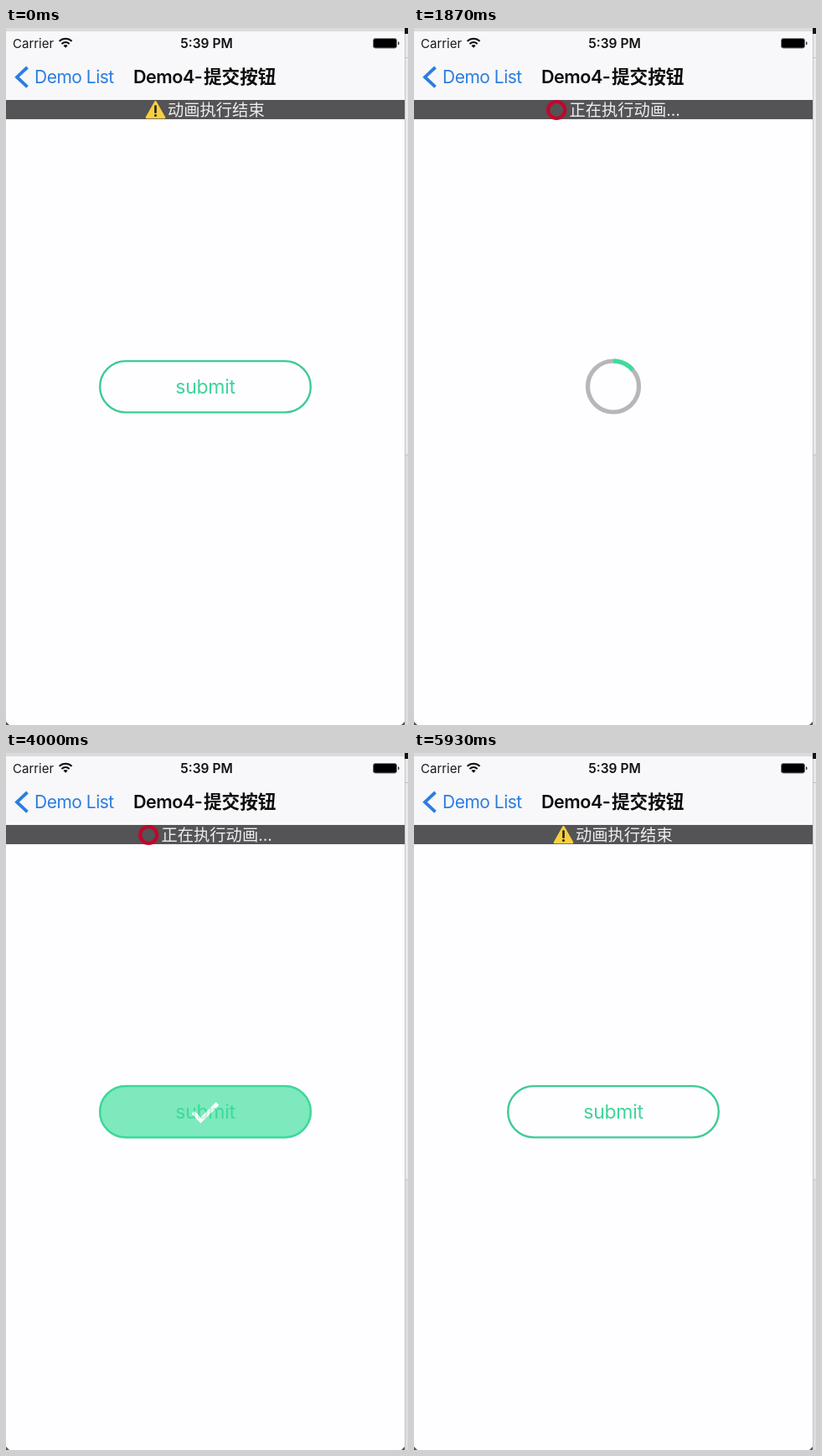
An HTML page that plays this animation: 480x833 px, repeating every 5990 ms.

```html
<!DOCTYPE html>
<html lang="zh">
<head>
<meta charset="utf-8">
<title>Submit button</title>
<style>
  html, body { margin: 0; width: 100%; height: 100%; overflow: hidden; background: #fefdff; }
  svg { display: block; width: 480px; height: 833px; }
  text { font-family: Inter, "Noto Sans CJK SC", "Noto Sans CJK", sans-serif; }
</style>
</head>
<body>
<svg viewBox="0 0 480 833">
  <defs>
    <clipPath id="pill"><rect x="112" y="398" width="252" height="61.5" rx="30.7"/></clipPath>
  </defs>

  <!-- screen and window edge -->
  <rect width="480" height="833" fill="#fefdff"/>
  <rect width="476" height="86" fill="#f8f7f9"/>
  <rect width="480" height="4" fill="#dcdadd"/>
  <rect x="476" width="4" height="833" fill="#e9e8ea"/>
  <rect x="476" y="510" width="4" height="323" fill="#dddcde"/>
  <rect x="476" width="1" height="833" fill="#c4c3c6"/>
  <path d="M476 35.5h4M476 510h4" stroke="#c0bfc2"/>
  <rect x="476" width="4" height="7" fill="#111"/>
  <path d="M0 829v4h4zM476 829v4h-4z" fill="#555"/>

  <!-- status bar -->
  <text x="8" y="24" font-size="15" fill="#1a1a1a">Carrier</text>
  <g fill="none" stroke="#111" stroke-width="2.1">
    <path d="M63.6 15.8a10.6 10.6 0 0 1 15 0M66.5 18.9a6.6 6.6 0 0 1 9.2 0"/>
    <path d="M71.1 23.8l-2.6-2.7a3.8 3.8 0 0 1 5.2 0z" fill="#111" stroke="none"/>
  </g>
  <text x="239.5" y="24" font-size="15.5" font-weight="600" text-anchor="middle" fill="#111">5:39 PM</text>
  <rect x="438.5" y="12.5" width="28" height="11.5" rx="2.5" fill="#000" stroke="#777"/>
  <path d="M468 16v4.6q1.6-.6 1.6-2.3t-1.6-2.3z" fill="#333"/>

  <!-- navigation bar -->
  <path d="M25.5 47L13 58.7L25.5 70.4" fill="none" stroke="#2a7de0" stroke-width="3.8"/>
  <text x="34" y="66" font-size="21" letter-spacing="-.5" fill="#2a7de0">Demo List</text>
  <g font-size="21.6" font-weight="600" fill="#0c0c0c">
    <text x="152" y="66" letter-spacing="-.5">Demo4-</text>
    <text x="236" y="66">提交按钮</text>
  </g>

  <!-- banner -->
  <rect y="86" width="476" height="23" fill="#545355"/>
  <g font-size="19.3" fill="#f0eff0">
    <g id="ended">
      <path d="M178.5 88.3L189 107H168z" fill="#f8cf3d" stroke="#f8cf3d" stroke-width="2.6" stroke-linejoin="round"/>
      <path d="M178.5 93.5v7.2" stroke="#222" stroke-width="2.6" stroke-linecap="round"/>
      <circle cx="178.5" cy="104.4" r="1.5" fill="#222"/>
      <text x="193" y="105">动画执行结束</text>
    </g>
    <g id="running">
      <circle cx="170.2" cy="98" r="10" fill="none" stroke="#c2062b" stroke-width="4.2"/>
      <text x="185.5" y="105">正在执行动画...</text>
    </g>
  </g>

  <!-- button -->
  <g id="button">
    <circle id="ripple" cx="238" cy="428.5" fill="#3bdd9a" fill-opacity=".2" clip-path="url(#pill)"/>
    <rect id="outline" y="398.1" height="61.3" ry="30.6" fill="#3bdd9a" stroke="#3ccb95" stroke-width="2.4"/>
    <text id="label" x="238" y="437" font-size="23" letter-spacing="-.3" text-anchor="middle" fill="#3fd39b">submit</text>
  </g>
  <g id="loader" fill="none" stroke-width="5.2">
    <circle cx="238" cy="428.5" r="30.5" stroke="#b7b6b8"/>
    <circle id="arc" cx="238" cy="428.5" r="30.5" stroke="#3bdd9a" pathLength="100" transform="rotate(-90 238 428.5)"/>
  </g>
  <g id="done">
    <rect id="fill" y="396.8" height="63.6" rx="31.8" fill="#3bdf9b"/>
    <circle id="ghost" cy="428.5" r="30.5" fill="none" stroke="#fff" stroke-width="4"/>
    <path id="check" d="M-14.5 1l9 9.5l20-20" fill="none" stroke="#fff" stroke-width="5"/>
  </g>
</svg>
<script>
const LOOP = 5990, STEP = 1000 / 15, MID = 238;
const TAP = 600, SHRINK = 770, LOAD = 1190, EXPAND = 3240, FADE = 3850, END = 4310;

const $ = {};
document.querySelectorAll('[id]').forEach(el => $[el.id] = el);

const set = (el, attrs) => {
  for (const k in attrs) el.setAttribute(k, attrs[k]);
};
const show = (el, on) => set(el, { visibility: on ? 'visible' : 'hidden' });
const lerp = (a, b, p) => a + (b - a) * p;
const part = (t, from, length) => Math.min(1, Math.max(0, (t - from) / length));

// Cubic bezier easing with y1 = 0 and y2 = 1, solved by bisection
const bezier = (x1, x2) => x => {
  let lo = 0, hi = 1;
  for (let i = 0; i < 24; i++) {
    const s = (lo + hi) / 2, r = 1 - s;
    if (3 * r * r * s * x1 + 3 * r * s * s * x2 + s * s * s < x) lo = s;
    else hi = s;
  }
  return lo * lo * (3 - 2 * lo);
};
const easeIn = bezier(.42, 1);
const easeInOut = bezier(.42, .58);

function draw(t) {
  const busy = t >= TAP && t < END;
  show($.running, busy);
  show($.ended, !busy);

  const restored = t >= FADE;
  show($.button, t < LOAD || restored);
  show($.loader, t >= LOAD && t < EXPAND + 60);
  show($.done, t >= EXPAND && t < END);

  const shrink = restored ? 0 : easeInOut(part(t, SHRINK, 360));
  const width = lerp(251.6, 55.6, shrink);
  const tint = !restored && t >= SHRINK ? .2 * (1 - shrink) : 0;
  set($.outline, { x: MID - width / 2, width, rx: Math.min(30.6, width / 2), 'fill-opacity': tint });
  set($.label, { opacity: restored ? 1 : 1 - part(t, SHRINK, 120) });
  set($.ripple, { r: t >= TAP && t < SHRINK ? 130 * part(t, TAP, SHRINK - TAP) : 0 });

  const loaded = 100 * easeIn(part(t, 1250, 2000));
  set($.arc, { 'stroke-dasharray': `${loaded} 200`, opacity: loaded > 0 ? 1 : 0 });

  const grow = easeIn(part(t, EXPAND, 295));
  const full = lerp(63.6, 254, grow), left = MID - full / 2;
  set($.fill, { x: left, width: full, opacity: part(t, EXPAND - 40, 140) });
  set($.ghost, { cx: left + 32, opacity: .06 * (1 - grow) });
  set($.check, {
    transform: `translate(${left + 127} 428.5)`,
    opacity: part(t, 3410, 280)
  });
  set($.done, { opacity: 1 - part(t, FADE, 440) });
}

const start = performance.now();
function tick() {
  const t = (performance.now() - start) % LOOP;
  draw(Math.floor((t + 4) / STEP) * STEP);
  requestAnimationFrame(tick);
}
tick();
</script>
</body>
</html>
```
